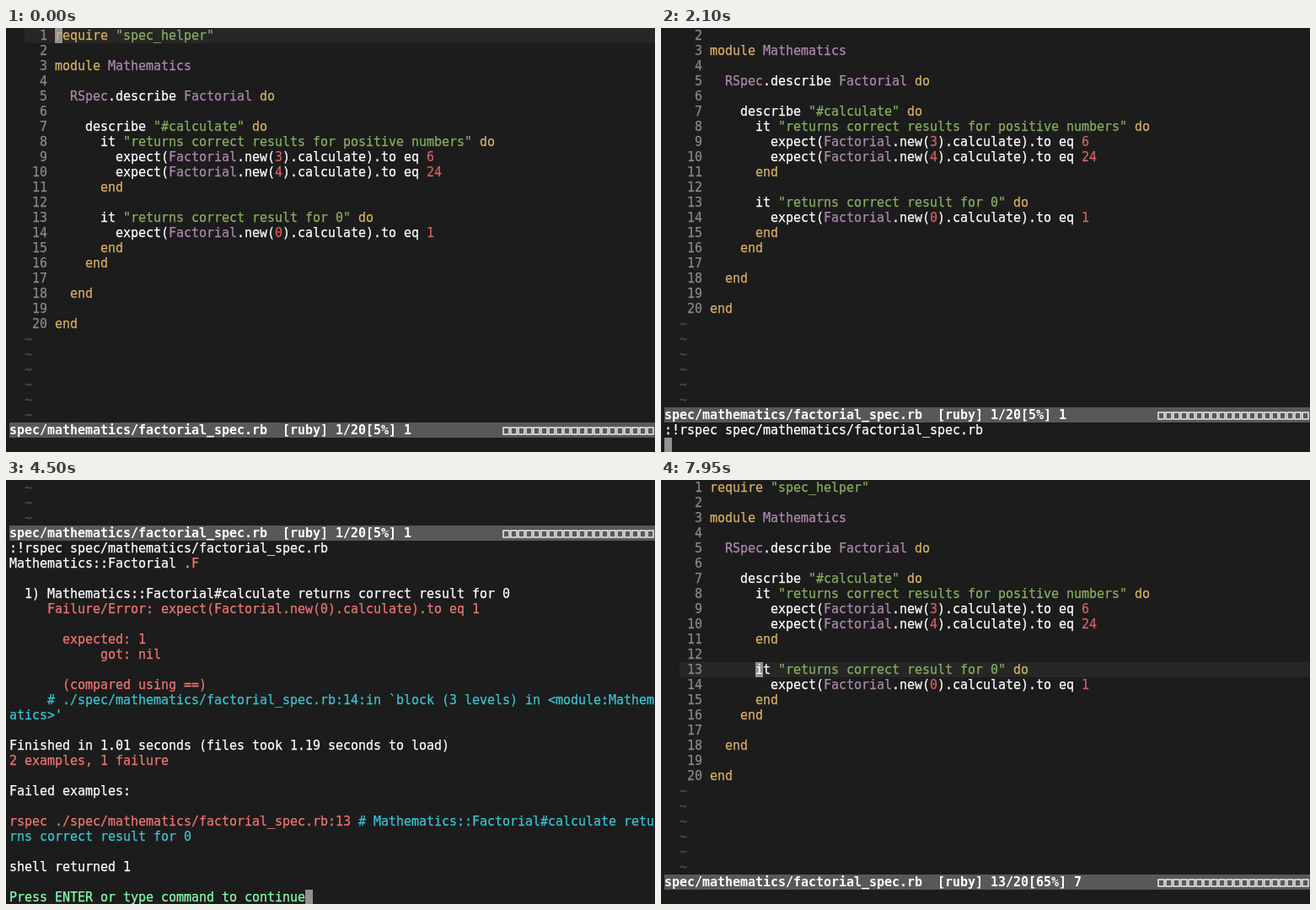
Recreate the animation shown at these times as an HTML page with a canvas. Size 770 px wide and 503 px high, loop 8 s.

```html
<!DOCTYPE html>
<html>
<head>
<meta charset="utf-8">
<style>
html, body { margin: 0; width: 770px; height: 503px; overflow: hidden; background: #1c1c1c; }
canvas { display: block; }
</style>
</head>
<body>
<canvas id="stage" width="770" height="503"></canvas>
<script>
const ctx = document.getElementById('stage').getContext('2d');
const CELL = 9, ROW = 18, LEFT = 4, LOOP = 8000;
const FONT = '15px "DejaVu Sans Mono", monospace';
const BG = '#1c1c1c', WHITE = '#ffffff', YELLOW = '#d7af5f', GREEN = '#87af5f', PURPLE = '#af87af',
  RED = '#d75f5f', GREY = '#8a8a8a', DIM = '#4e4e4e', BAR = '#585858', CURSOR = '#929292', LINE = '#262626',
  FAIL = '#ed7672', CYAN = '#36c5d3', PROMPT = '#84ffae', PASS = '#b5bd68';

const FILE = 'spec/mathematics/factorial_spec.rb';
const CODE = `require "spec_helper"

module Mathematics

  RSpec.describe Factorial do

    describe "#calculate" do
      it "returns correct results for positive numbers" do
        expect(Factorial.new(3).calculate).to eq 6
        expect(Factorial.new(4).calculate).to eq 24
      end

      it "returns correct result for 0" do
        expect(Factorial.new(0).calculate).to eq 1
      end
    end

  end

end`.split('\n');

// Each report line: row, colour, text
const REPORT = [
  [7, WHITE, '  1) Mathematics::Factorial#calculate returns correct result for 0'],
  [8, FAIL, '     Failure/Error: expect(Factorial.new(0).calculate).to eq 1'],
  [10, FAIL, '       expected: 1'],
  [11, FAIL, '            got: nil'],
  [13, FAIL, '       (compared using ==)'],
  [14, CYAN, `     # ./${FILE}:14:in \`block (3 levels) in <module:Mathem`],
  [15, CYAN, "atics>'"],
  [17, WHITE, 'Finished in 1.01 seconds (files took 1.19 seconds to load)'],
  [18, FAIL, '2 examples, 1 failure'],
  [20, WHITE, 'Failed examples:'],
  [22, FAIL, `rspec ./${FILE}:13`],
  [23, CYAN, 'rns correct result for 0'],
  [25, WHITE, 'shell returned 1'],
  [27, PROMPT, 'Press ENTER or type command to continue']
];

// Time and number of typed characters of the command
const COMMAND = ':TestFile';
const KEYS = [[450, 1], [750, 2], [900, 4], [1050, 5], [1350, 6], [1500, 7], [1650, 8], [1800, 9]];

function text(col, row, str, color, bold) {
  ctx.font = (bold ? 'bold ' : '') + FONT;
  ctx.fillStyle = ctx.strokeStyle = color;
  ctx.lineWidth = 0.25;
  [...str].forEach((ch, i) => {
    if (ch === ' ') return;
    const x = LEFT + (col + i) * CELL, y = row * ROW + 14;
    ctx.fillText(ch, x, y);
    if (!bold) ctx.strokeText(ch, x, y);
  });
}

function block(col, row, cells, color) {
  ctx.fillStyle = color;
  ctx.fillRect(LEFT + col * CELL, row * ROW, cells * CELL, ROW);
}

const cursor = (col, row) => block(col, row, 1, CURSOR);

function tokenColor(token) {
  if (token[0] === '"') return GREEN;
  if (/^\d/.test(token)) return RED;
  if (/^(require|module|do|end)$/.test(token)) return YELLOW;
  return /^[A-Z]/.test(token) ? PURPLE : WHITE;
}

function codeLine(str, row) {
  for (const m of str.matchAll(/"[^"]*"|\w+|[^\w\s"]+/g)) text(6 + m.index, row, m[0], tokenColor(m[0]));
}

function statusBar(row, position) {
  const y = row * ROW;
  ctx.fillStyle = BAR;
  ctx.fillRect(LEFT, y, 766, ROW);
  text(0, row, `${FILE}  [ruby] ${position}`, WHITE, true);
  ctx.strokeStyle = WHITE;
  ctx.lineWidth = 1.3;
  for (let i = 65; i < 85; i++) ctx.strokeRect(LEFT + i * CELL + 1, y + 6, 7, 8);
}

// Editor window, moved up by a number of rows
function editor(shift, active, position, drawCursor) {
  if (active) {
    ctx.fillStyle = LINE;
    ctx.fillRect(22, (active - 1) * ROW, 748, ROW);
  }
  if (drawCursor) cursor(6 + CODE[active - 1].search(/\S/), active - 1);
  for (let i = 0; i < 26; i++) {
    const row = i - shift;
    if (row < 0) continue;
    if (i < CODE.length) {
      text(2, row, String(i + 1).padStart(3), GREY);
      codeLine(CODE[i], row);
    } else {
      text(2, row, '~', DIM);
    }
  }
  statusBar(26 - shift, position);
}

function typing(t) {
  editor(0, 1, '1/20[5%] 1', t < 300);
  const key = KEYS.filter(k => t >= k[0]).pop();
  if (!key) return;
  text(0, 27, COMMAND.slice(0, key[1]), WHITE);
  cursor(key[1], 27);
}

function running(t) {
  const done = t >= 4500;
  const shift = done ? 23 : 1;
  editor(shift, 0, '1/20[5%] 1');
  text(0, 27 - shift, `:!rspec ${FILE}`, WHITE);
  if (t < 3450) return cursor(0, 27);
  const row = 28 - shift;
  text(0, row, 'Mathematics::Factorial', WHITE);
  if (t >= 3900) text(23, row, '.', PASS);
  if (!done) return cursor(t < 3900 ? 23 : 24, row);
  text(24, row, 'F', FAIL);
  for (const [r, color, str] of REPORT) text(0, r, str, color);
  text(46, 22, '# Mathematics::Factorial#calculate retu', CYAN);
  if (t < 5400) cursor(39, 27);
}

function jumping(t) {
  if (t >= 7950) return editor(0, 13, '13/20[65%] 7', true);
  editor(0, 1, '1/20[5%] 1', true);
  if (t >= 7500) text(74, 27, t < 7650 ? '1' : '13', WHITE);
}

function draw() {
  const t = performance.now() % LOOP;
  ctx.fillStyle = BG;
  ctx.fillRect(0, 0, 770, 503);
  if (t < 2100) typing(t);
  else if (t < 6150) running(t);
  else jumping(t);
  requestAnimationFrame(draw);
}
draw();
</script>
</body>
</html>
```
